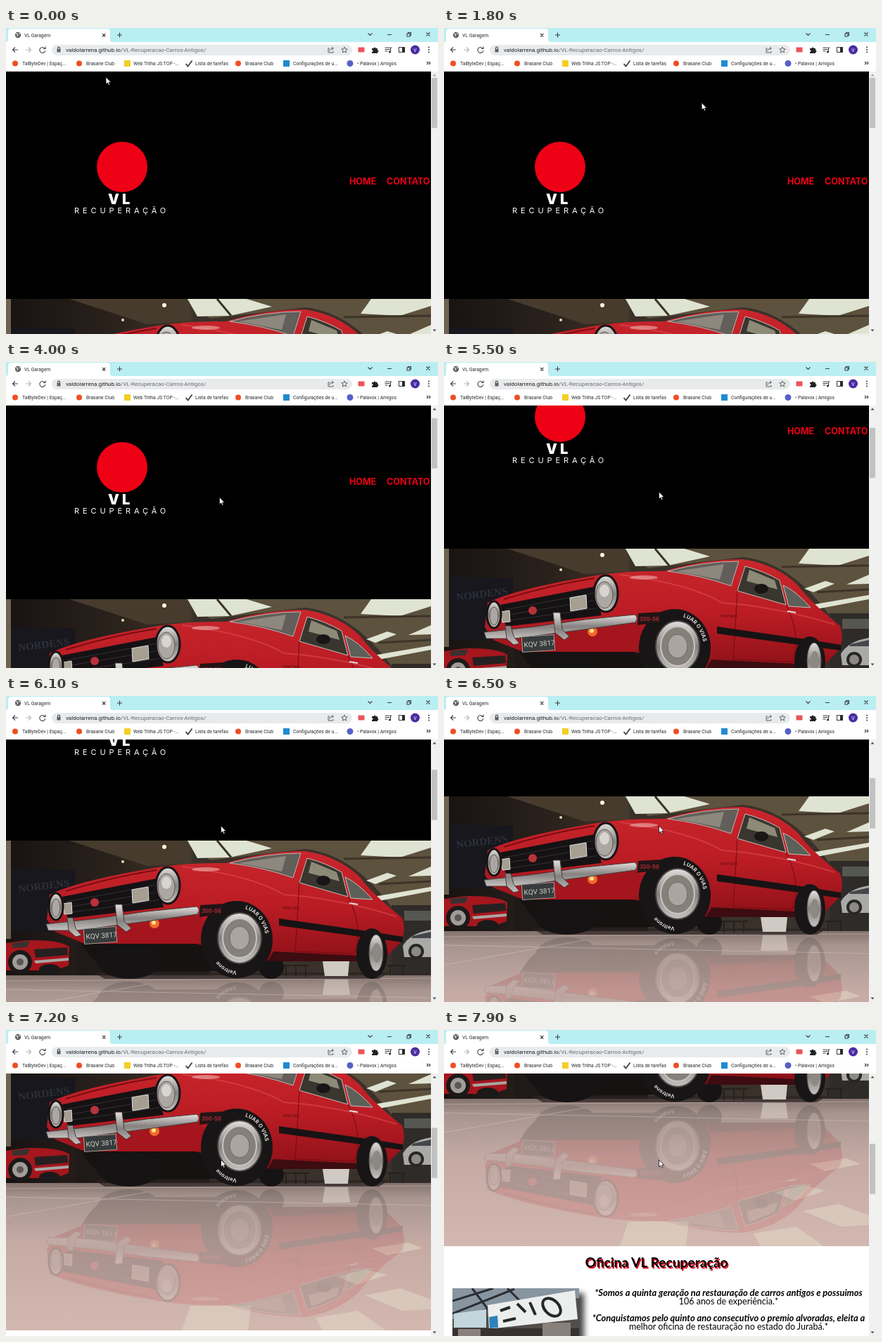
An HTML page for the animation above (8 s loop, 614 by 436 pixels).

```html
<!DOCTYPE html>
<html lang="pt">
<head>
<meta charset="utf-8">
<title>VL Garagem</title>
<style>
html, body { margin: 0; width: 100%; height: 100%; overflow: hidden; background: #fff; }
svg { display: block; }
.ui { font-family: Roboto, sans-serif; font-size: 6.8px; fill: #26282b; }
.line { fill: none; stroke: #3c4043; stroke-width: 1.1; }
.brand { font-family: Inter, sans-serif; }
.copy { font-family: Lato, sans-serif; font-size: 12.5px; text-anchor: middle; fill: #000; }
.copy .lead { font-weight: 700; font-style: italic; font-size: 12.9px; }
.copy .title { font-weight: 700; font-size: 19.2px; }
</style>
</head>
<body>
<svg width="614" height="436" viewBox="0 0 614 436">
<defs>
  <linearGradient id="floor" x2="0" y2="1">
    <stop offset="0" stop-color="#84736d"/><stop offset=".1" stop-color="#a8958f"/>
    <stop offset=".4" stop-color="#c5aaa4"/><stop offset="1" stop-color="#d3b7b1"/>
  </linearGradient>
  <linearGradient id="wall">
    <stop offset="0" stop-color="#171312"/><stop offset=".6" stop-color="#2b221c"/><stop offset="1" stop-color="#41372a"/>
  </linearGradient>
  <linearGradient id="paint" x2="0" y2="1">
    <stop offset="0" stop-color="#c9262c"/><stop offset=".5" stop-color="#bb1c24"/><stop offset="1" stop-color="#8e1118"/>
  </linearGradient>
  <linearGradient id="chrome" x2="0" y2="1">
    <stop offset="0" stop-color="#e2e0de"/><stop offset=".5" stop-color="#858180"/><stop offset="1" stop-color="#c6c2c0"/>
  </linearGradient>
  <path id="tread" d="M291 141a39 45 0 1 1 78 0a39 45 0 1 1-78 0"/>
  <clipPath id="photoClip"><path d="M0 0H604V402H0Z"/></clipPath>
  <clipPath id="shopClip"><path d="M12 848H192V980H12Z"/></clipPath>

  <g id="car">
    <path d="M105 140H300V186H150Q120 175 105 140Z" fill="#161211"/>
    <ellipse cx="175" cy="172" rx="45" ry="25" fill="#151314"/>
    <ellipse cx="377" cy="180" rx="18" ry="17" fill="#151314"/>
    <path d="M62 77Q100 58 205 40Q250 31 313 32Q370 15 425 15Q472 22 503 52Q520 76 563 110Q569 125 562 144L540 166L500 171H370L270 147H112L70 130L58 112Z" fill="url(#paint)"/>
    <path d="M70 126L200 114L272 104L290 125L270 147H112Z" fill="#a5151d"/>
    <path d="M380 158L500 164V172H372Z" fill="#3c0c10"/>
    <path d="M250 37Q350 50 395 77Q470 82 555 108" fill="none" stroke="#e2555a" stroke-width="2" opacity=".5"/>
    <ellipse cx="284" cy="41" rx="20" ry="3" fill="#f0b5b0" opacity=".6"/>
    <path d="M85 72Q150 52 214 42" fill="none" stroke="#7b0c13" stroke-width="2"/>
    <path d="M318 32Q370 18 419 18L408 53Q365 38 318 32Z" fill="#625e59" stroke="#bbb6b1"/>
    <path d="M330 32L398 22L392 44Z" fill="#8d877d"/>
    <path d="M428 25Q455 32 477 45L486 80L417 60Z" fill="#38362f" stroke="#c5c0bb"/>
    <path d="M434 30L470 45L474 58L430 46Z" fill="#8d8a78"/>
    <path d="M482 52Q500 60 521 84L490 82Z" fill="#5c6058" stroke="#c5c0bb"/>
    <ellipse cx="451" cy="57" rx="10" ry="7" fill="#191617"/>
    <path d="M417 60L411 158L495 161Q509 125 486 80" fill="none" stroke="#730b12"/>
    <path d="M488 89l12 2" stroke="#ddd" stroke-width="2"/>
    <path d="M388 111L520 130L564 137V145L520 139L388 121Z" fill="#171314"/>
    <text x="393" y="98" font-size="5" font-family="Inter,sans-serif" fill="#54090d">VENTURO</text>
    <path d="M80 80L214 54L224 95L88 111Z" fill="#151214"/>
    <path d="M86 87L214 63M87 95L218 73M88 103L222 84" stroke="#343034"/>
    <circle cx="126" cy="88" r="6" fill="#b8323a"/>
    <path d="M179 70l23-4l1 19l-23 4ZM81 90l12-2l1 16l-11 1Z" fill="#a69e90" stroke="#ddd"/>
    <g stroke="#171314" stroke-width="3" fill="url(#chrome)">
      <ellipse cx="230" cy="64" rx="17" ry="26"/><ellipse cx="71" cy="94" rx="10" ry="19"/>
    </g>
    <ellipse cx="228" cy="66" rx="12" ry="19" fill="#aca7a2" stroke="#5d5753"/>
    <ellipse cx="228" cy="60" rx="7" ry="9" fill="#d8d5d0"/>
    <ellipse cx="71" cy="96" rx="6" ry="13" fill="#aca7a2" stroke="#5d5753"/>
    <circle cx="211" cy="118" r="7" fill="#f06a2a"/><circle cx="210" cy="117" r="3" fill="#ffe28a"/>
    <path d="M57 119Q130 112 200 101L271 94Q277 98 272 105L200 115L100 128H60Z" fill="url(#chrome)" stroke="#453c3a"/>
    <path d="M87 110h8l4 15l8 10l-8 2l-10-9ZM155 91h10l3 24l10 10l-7 5l-13-10Z" fill="url(#chrome)" stroke="#443c3b"/>
    <g transform="rotate(-4 134 135)">
      <path d="M111 124h46v22h-46Z" fill="#383b3c" stroke="#a5a5a0"/>
      <text x="113.500" y="139" font-size="10" font-family="Roboto,sans-serif" fill="#cfcfc8">KQV 3817</text>
    </g>
    <ellipse cx="328" cy="141" rx="51" ry="55" fill="#171516"/>
    <ellipse cx="332" cy="139" rx="31" ry="36" fill="url(#chrome)" stroke="#4b4745" stroke-width="2"/>
    <ellipse cx="332" cy="139" rx="24" ry="28" fill="#858079" stroke="#c9c5c0" stroke-width="2"/>
    <ellipse cx="332" cy="139" rx="14" ry="17" fill="#aaa59f" stroke="#6b6663"/>
    <path d="M276 92L309 90L306 105L275 109Z" fill="#221416"/>
    <text x="278" y="103" font-size="7.500" font-weight="700" font-family="Inter,sans-serif" fill="#a92c34">350-S6</text>
    <g font-family="Inter,sans-serif" font-size="7.500" font-weight="700" fill="#dddad5">
      <text><textPath href="#tread" startOffset="76">LUAR O VIAS</textPath></text>
      <text><textPath href="#tread" startOffset="200">Veltrone</textPath></text>
    </g>
    <ellipse cx="520" cy="161" rx="22" ry="36" fill="#171516"/>
    <ellipse cx="526" cy="160" rx="10" ry="26" fill="url(#chrome)" stroke="#514c49"/>
    <ellipse cx="527" cy="160" rx="6" ry="14" fill="#8e8883"/>
  </g>
</defs>

<svg y="62" width="604" height="374" viewBox="0 62 604 374">
<g id="page">
  <path d="M0 0H604V386H0Z"/>
  <circle cx="165" cy="198" r="36" fill="#ee0015"/>
  <g class="brand" fill="#fff">
    <text x="145" y="251" font-size="20" font-weight="900" letter-spacing="4">VL</text>
    <text x="97" y="264" font-size="11" letter-spacing="4.9">RECUPERAÇÃO</text>
  </g>
  <g class="brand" font-size="12.5" font-weight="700" fill="#ee0015">
    <text x="488" y="223">HOME</text><text x="541" y="223">CONTATO</text>
  </g>

  <g transform="translate(0 386)" clip-path="url(#photoClip)">
    <path d="M0 0H604V200H0Z" fill="#39312a"/>
    <path d="M0 0H265V200H0Z" fill="url(#wall)"/>
    <path d="M90 0H262V32L200 36Z" fill="#463b2d"/>
    <path d="M256 0H604V112H560Q500 20 425 12L290 28Z" fill="#5d523e"/>
    <path d="M258 0H342L378 11L318 24L272 25ZM519 0H604V10L560 24L504 21ZM572 51L604 37V50ZM522 80L604 66V72L530 86ZM512 57l30-11l13 4l-30 12Z" fill="#dfe3d2"/>
    <path d="M300 0l20 24M480 26L604 24M530 62L604 58" stroke="#3c3428" stroke-width="3"/>
    <circle cx="225" cy="9" r="3" fill="#fff7d8"/><circle cx="166" cy="30" r="2" fill="#e8d7b0"/>
    <path d="M548 92H604V196H548Z" fill="#2f2b29"/>
    <path d="M566 100H604V114H566Z" fill="#565751"/>
    <path d="M564 150Q574 132 604 127V166H566Z" fill="#a9aaa7"/>
    <path d="M578 136L604 130V139H576Z" fill="#44474a"/>
    <circle cx="583" cy="158" r="11" fill="#292726"/><circle cx="583" cy="158" r="7" fill="#8b8a87"/>
    <path d="M0 0H7V140H0Z" fill="#6d6251"/>
    <path d="M8 40L98 42V130H8Z" fill="#17171d"/>
    <text x="18" y="74" transform="rotate(-7 18 74)" font-family="Liberation Serif,serif" font-weight="700" font-size="15" fill="#2e303c">NORDENS</text>
    <path d="M100 130H290V196H100Z" fill="#1f1a18"/>
    <path d="M0 146L30 142Q75 141 90 151L89 178L70 185H0Z" fill="#a5161d"/>
    <path d="M8 146L34 143L30 152L10 153Z" fill="#39312f"/>
    <path d="M40 155L87 152L88 163L42 167Z" fill="#272020"/>
    <path d="M40 171L89 167V171L42 175Z" fill="#aaa5a1"/>
    <circle cx="20" cy="173" r="17" fill="#1b1919"/><circle cx="20" cy="173" r="11" fill="#a19c98"/><circle cx="20" cy="173" r="5" fill="#5b5755"/>
    <ellipse cx="62" cy="184" rx="15" ry="8" fill="#1b1919"/>
    <path d="M0 192H604V402H0Z" fill="url(#floor)"/>
    <path d="M262 367H348L344 402H250ZM470 325l42-10l30 8l-44 14ZM520 285l52-8l20 8l-50 10ZM510 352l50-10l44 16v14l-40 2ZM440 384l60-10l40 28h-90Z" fill="#e0d6c4" opacity=".6"/>
    <use href="#car" transform="matrix(1 0 0 -1 0 398)" opacity=".15"/>
    <path d="M0 200L604 196M0 212L604 224M0 240L200 205" stroke="#d8c9c4" opacity=".45"/>
    <path d="M125 188H545L530 197H140Z" fill="#2b2322" opacity=".7"/>
    <path d="M392 178h40M398 178v16M412 178v16M426 178v16M542 178h26M546 178v14M564 178v14" stroke="#26211f" stroke-width="2"/>
    <use href="#car"/>
    <path d="M450 172H488L486 193H453Z" fill="#cfcac3"/>
    <path d="M453 198H486L489 220H450Z" fill="#e6ddd6" opacity=".5"/>
  </g>

  <path d="M0 788H604V1000H0Z" fill="#fff"/>
  <g style="filter:drop-shadow(7px 7px 4px #000b)">
    <g clip-path="url(#shopClip)">
      <path d="M12 848H192V980H12Z" fill="#514d4a"/>
      <path d="M12 848H192V862L62 876L12 892Z" fill="#8795a0"/>
      <path d="M12 866L70 848M12 884L100 849M40 848L64 880M90 848L110 868" stroke="#2b2e33" stroke-width="3"/>
      <path d="M14 884L60 878V904H14Z" fill="#c3d6de"/>
      <path d="M62 872L186 851L190 892L64 906Z" fill="#eceeed"/>
      <path d="M64 889L76 887L77 904L65 905Z" fill="#2d83b9"/>
      <g fill="none" stroke="#26272a" stroke-width="4">
        <ellipse cx="153" cy="875" rx="15" ry="10" transform="rotate(45 153 875)"/>
        <path d="M80 880l14-5M84 895l18-4M104 870l12 12M122 868l8 18"/>
      </g>
      <path d="M12 905H192V980H12Z" fill="#37322f"/>
      <path d="M20 906H52V920H20ZM140 897H180V920H140Z" fill="#88807a"/>
    </g>
  </g>
  <g class="copy">
    <text class="title" x="303.500" y="819.500" style="fill:#e0001a">Oficina VL Recuperação</text>
    <text class="title" x="302" y="818">Oficina VL Recuperação</text>
    <text class="lead" x="404.500" y="859">*Somos a quinta geração na restauração de carros antigos e possuimos</text>
    <text x="404.500" y="871">106 anos de experiência.*</text>
    <text class="lead" x="404.500" y="895">*Conquistamos pelo quinto ano consecutivo o premio alvoradas, eleita a</text>
    <text x="404.500" y="907">melhor oficina de restauração no estado do Jurabá.*</text>
  </g>
</g>
</svg>

<g class="ui">
  <path d="M0 0H614V20H0Z" fill="#b9eef2"/>
  <path d="M0 20Q3 20 3 16V5Q3 1 7 1H144Q148 1 148 5V16Q148 20 152 20H614V62H0Z" fill="#fff"/>
  <circle cx="17" cy="10" r="4.200" fill="#5f6368"/>
  <path d="M14 8l3 1l-1 3M18 7l2 2" stroke="#fff" fill="none"/>
  <text x="26" y="12.600">VL Garagem</text>
  <path class="line" d="M137 8l4.400 4.400m0-4.400l-4.400 4.400M161.500 6.500v7m-3.500-3.500h7M514.500 7.500l3 3l3-3M542 9.500h6M597.500 6.500l5 5m0-5l-5 5M570 8h4v4h-4ZM571.500 8v-1.500h4v4h-1.500"/>
  <path class="line" d="M17 31H9.500m3.500-3.500l-3.500 3.500l3.500 3.500M55 29a4 4 0 1 0 .8 3M56 26.500v3h-3"/>
  <path class="line" d="M28 31h7.500m-3.500-3.500l3.500 3.500l-3.500 3.500" style="stroke:#b5b8bb"/>
  <rect x="65" y="24" width="427" height="15" rx="7.500" fill="#e8eaec"/>
  <path d="M72.500 30h5v4.500h-5Z" fill="#5f6368"/>
  <path class="line" d="M73.500 30v-1.500a1.500 1.500 0 0 1 3 0V30"/>
  <text x="85" y="34" style="font-size:8.100px;fill:#202124">valdolarrena.github.io<tspan fill="#6a6e73">/VL-Recuperacao-Carros-Antigos/</tspan></text>
  <path class="line" d="M460 29h-2v6h7v-2M460 33q0-4 5-4m-2-2l2.500 2l-2.500 2M481 27l1.200 2.700l3 .3l-2.300 2l.7 3l-2.600-1.600l-2.600 1.600l.7-3l-2.300-2l3-.3Z" style="stroke-width:.8"/>
  <rect x="500.500" y="27.500" width="9" height="7" rx="1" fill="#e9555a"/>
  <path d="M520 29h2.500a1.500 1.500 0 1 1 3 0H528v2.500a1.500 1.500 0 1 1 0 3V36H520v-2a1.500 1.500 0 0 0 0-3Z" fill="#202124"/>
  <path class="line" d="M538.500 28h7m-7 2.500h7m-7 2.500h4M546.500 34v-6h2M558.500 27.500h8v7h-8Z"/>
  <circle cx="545.500" cy="34" r="1.500"/><path d="M563 27.500h3.500v7H563Z"/>
  <circle cx="581.500" cy="31" r="6.500" fill="#4a2ba3"/>
  <text x="581.500" y="33.500" text-anchor="middle" style="fill:#fff">V</text>
  <circle cx="601" cy="27.500" r=".9"/><circle cx="601" cy="31" r=".9"/><circle cx="601" cy="34.500" r=".9"/>

  <g fill="#ef4e23"><circle cx="13" cy="50.500" r="4"/><circle cx="104" cy="50.500" r="4"/><circle cx="330" cy="50.500" r="4"/></g>
  <rect x="168" y="46" width="9" height="9" fill="#f3cf25"/>
  <path class="line" d="M255.500 51l3 3.500l6-8" style="stroke-width:1.800"/>
  <rect x="394" y="46" width="9" height="9" fill="#1f8ad2"/>
  <circle cx="489" cy="50.500" r="4.500" fill="#5460c8"/>
  <text x="23" y="52.600">TalByteDev | Espaç...</text>
  <text x="114" y="52.600">Brasane Club</text>
  <text x="181" y="52.600">Web Trilha JS TOP -...</text>
  <text x="269" y="52.600">Lista de tarefas</text>
  <text x="340" y="52.600">Brasane Club</text>
  <text x="408" y="52.600">Configurações de u...</text>
  <text x="499" y="52.600">• Palavox | Amigos</text>
  <path class="line" d="M598 48l2 2l-2 2m3-4l2 2l-2 2"/>
</g>

<path d="M604 62H614V436H604Z" fill="#f1f1f1"/>
<path id="up" d="M606.500 68.500h5l-2.500-3Z"/>
<path d="M606.500 429.500h5l-2.500 3Z" fill="#505050"/>
<rect id="thumb" x="605" width="8" height="71.500" fill="#c1c1c1"/>
<path id="cursor" d="M0 0V10L2.400 8L4 11.400L5.600 10.700L4.100 7.400H7.200Z" fill="#fff" stroke="#000" stroke-width=".7"/>
</svg>

<script>
const LOOP = 8000, TICK = 100, NOTCH = 60;
// start and end of each wheel notch, ms
const notches = [[3750, 4100], [4200, 4600], [5650, 5950], [6100, 6300],
  [6450, 6800], [6950, 7200], [7350, 7600], [7720, 7900]];
// pointer path: time, x, y
const path = [[200, 142, 70], [700, 240, 101], [900, 310, 115], [1100, 336, 102], [1200, 339, 102],
  [1700, 339, 102], [2200, 475, 125], [2600, 606, 140], [3200, 604, 138], [3500, 301, 199],
  [3800, 302, 198], [4300, 305.5, 185]];

const el = id => document.getElementById(id);
const [page, thumb, up, cursor] = ['page', 'thumb', 'up', 'cursor'].map(el);
const progress = (t, a, b) => Math.min(1, Math.max(0, (t - a) / (b - a)));
const ease = p => p * p * (3 - 2 * p);

const scrollAt = t => notches.reduce((sum, [a, b]) => sum + NOTCH * ease(progress(t, a, b)), 0);

function pointerAt(t) {
  const i = path.findIndex(key => key[0] > t);
  if (i === 0) return path[0].slice(1);
  if (i < 0) return path[path.length - 1].slice(1);
  const [a, x, y] = path[i - 1], [b, nextX, nextY] = path[i];
  const p = progress(t, a, b);
  return [x + (nextX - x) * p, y + (nextY - y) * p];
}

function draw(now) {
  const t = Math.floor(now % LOOP / TICK) * TICK;
  const scroll = Math.round(scrollAt(t));
  page.setAttribute('transform', `translate(0 ${-scroll})`);
  thumb.setAttribute('y', 71 + scroll * .19);
  up.setAttribute('fill', scroll ? '#505050' : '#a3a3a3');
  cursor.setAttribute('transform', `translate(${pointerAt(t)})`);
  requestAnimationFrame(draw);
}
requestAnimationFrame(draw);
</script>
</body>
</html>
```
